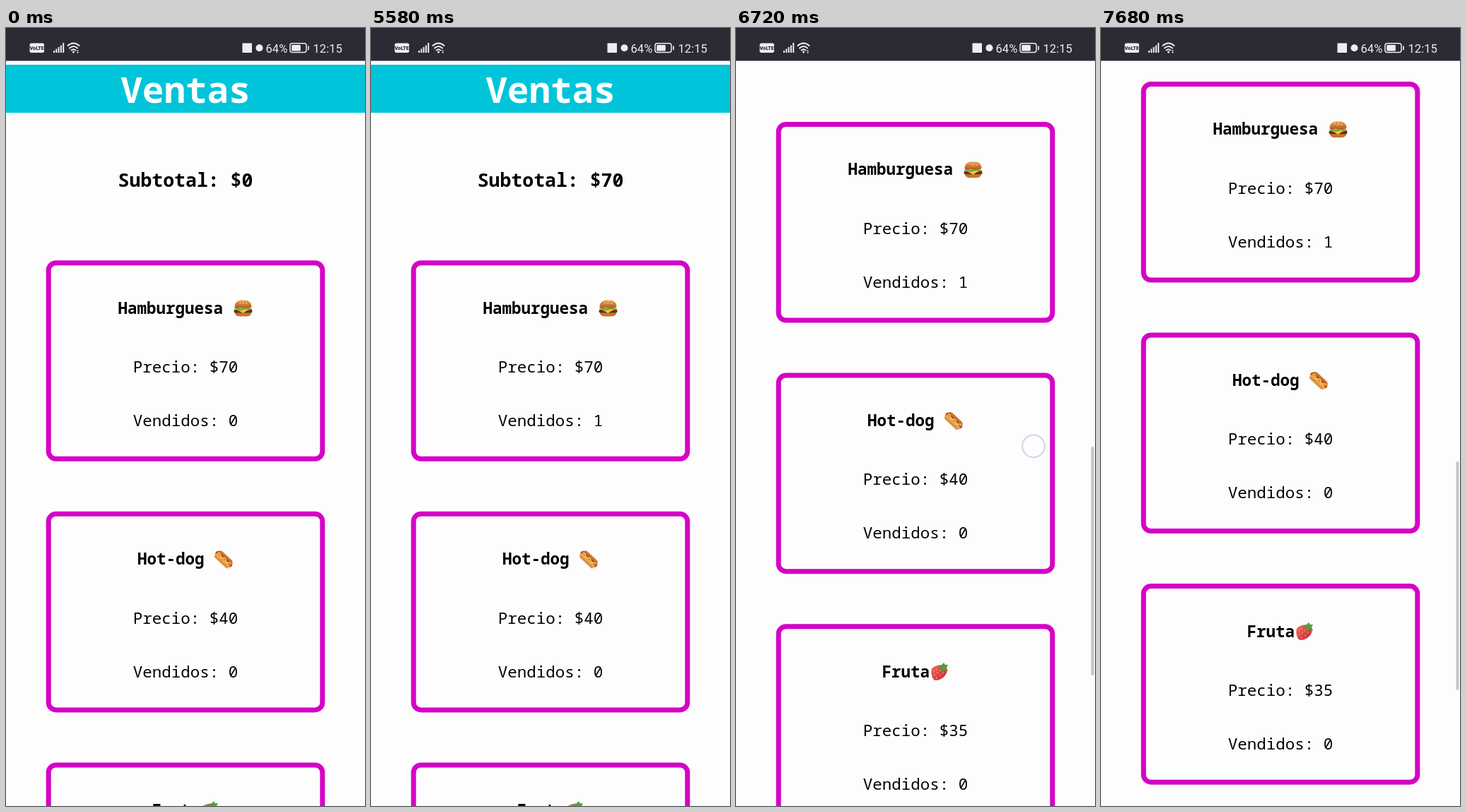
These frames come from a looping animation (508x1102 px, 8000 ms). An HTML page:

```html
<!DOCTYPE html>
<html lang="es">
<head>
<meta charset="utf-8">
<title>Ventas</title>
<style>
html, body { margin: 0; width: 100%; height: 100%; overflow: hidden; background: #fdfdfd; }
svg { display: block; width: 100vw; height: 100vh; }
#page text { font-family: "Noto Sans Mono", "DejaVu Sans Mono", monospace; font-size: 22.5px; font-weight: 500; fill: #000; }
#page .bold { font-weight: 700; }
#page .title { font-size: 51px; font-weight: 700; fill: #fff; }
#page .total { font-size: 26.5px; font-weight: 600; }
#bar text { font-family: Roboto, "Open Sans", sans-serif; font-size: 16.6px; fill: #eeeef2; }
#bar .tiny { font-size: 7.2px; font-weight: 800; fill: #2b2a35; }
</style>
</head>
<body>
<svg viewBox="0 0 508 1102" xmlns="http://www.w3.org/2000/svg">
  <defs>
    <linearGradient id="bun" x2="0" y2="1">
      <stop stop-color="#e9a04d"/><stop offset="1" stop-color="#b9601f"/>
    </linearGradient>
    <linearGradient id="berry" x2="1" y2="1">
      <stop stop-color="#f46a5c"/><stop offset="1" stop-color="#c91f31"/>
    </linearGradient>

    <!-- Food icons, centred on 0,0 -->
    <g id="burger">
      <path d="M-12 4H12Q12 11.5 5 11.5H-5Q-12 11.5-12 4Z" fill="#c8752c"/>
      <rect x="-13" y="1.5" width="26" height="5" rx="2.5" fill="#6a301a"/>
      <path d="M-12 1H12L5 3.5L0 7L-6 3.5Z" fill="#fbc53c"/>
      <path d="M-13 0Q-10-3-7-1T0-1T7-1T13 0Q12 3 8 2T0 2.5T-8 2T-13 0Z" fill="#6cae3c"/>
      <path d="M-11-1.5H11" stroke="#d8432f" stroke-width="2"/>
      <path d="M-12-2Q-12-11.5 0-11.5T12-2Q0 0-12-2Z" fill="url(#bun)"/>
      <path d="M-5-8h1.5M0-9.5h1.5M4-7h1.5M-1-6.5h1.5" stroke="#fbe1ae" stroke-linecap="round"/>
    </g>
    <g id="hotdog" transform="rotate(43)">
      <rect x="-13.5" y="-7" width="27" height="9.5" rx="4.7" fill="#c77a33"/>
      <rect x="-15" y="-3.8" width="30" height="7" rx="3.5" fill="#b94a27"/>
      <rect x="-13.5" y="-.5" width="27" height="7.5" rx="3.7" fill="#e9a455"/>
      <path d="M-11 4.8H10" stroke="#cb8238" stroke-width="1.4" stroke-linecap="round"/>
      <path d="M-12-1Q-9.5-4-7-1T-2-1T3-1T8-1T12-2" fill="none" stroke="#fbd04d" stroke-width="1.6" stroke-linecap="round"/>
    </g>
    <g id="strawberry">
      <path d="M-6-8Q-13-6-11.5 3Q-10 12-5 12Q2 12 8 5Q13-2 8-6Q2-11-6-8Z" fill="url(#berry)"/>
      <path d="M-8-2v1M-4-4v1M-7 4v1M-3 1v1M1-2v1M-4 8v1M1 5v1M5 1v1" stroke="#fbb55f" stroke-width="1.2" stroke-linecap="round"/>
      <path d="M-3-9L3-10L6-13L8-10L12-10L10-6L12-1L7-3L4 1L3-5L-3-5L0-8Z" fill="#5a9a3b"/>
    </g>
  </defs>

  <rect width="508" height="1102" fill="#fdfdfd"/>
  <g id="page">
    <rect y="52" width="508" height="68" fill="#00c4d9"/>
    <text class="title" x="254" y="106" text-anchor="middle">Ventas</text>
    <text class="total" id="total" x="254" y="224.5" text-anchor="middle"></text>
    <g id="cards"></g>
  </g>
  <rect id="thumb" x="502.5" width="4" height="324" rx="2" fill="#c4c4c6"/>
  <circle id="touch" r="15.8" fill="#fff" fill-opacity=".6" stroke="#d2d2ea" stroke-width="2"/>

  <g id="bar">
    <rect width="508" height="46.5" fill="#2b2a35"/>
    <rect x="33.5" y="21.5" width="20.5" height="13.5" rx="2.5" fill="#eeeef2"/>
    <text class="tiny" x="43.7" y="31" text-anchor="middle">VoLTE</text>
    <path d="M68 35v-3M71.3 35v-5.5M74.6 35v-8M77.9 35v-10.5M81.2 35v-14" stroke="#eeeef2" stroke-width="2"/>
    <g fill="none" stroke="#eeeef2" stroke-width="1.9" stroke-linecap="round">
      <path d="M87.5 25Q95.5 18 103.5 25M90 28.5Q95.5 23.5 101 28.5M92.6 31.5Q95.5 29 98.4 31.5"/>
    </g>
    <circle cx="95.5" cy="34" r="1.5" fill="#eeeef2"/>
    <path d="M100 33l1.5-2l1.5 2zM100 34l1.5 2l1.5-2z" fill="#eeeef2"/>
    <rect x="334.5" y="21.5" width="13.5" height="13.5" fill="#eeeef2"/>
    <circle cx="358.5" cy="28.3" r="5" fill="#eeeef2"/>
    <text x="367.5" y="34.5">64%</text>
    <rect x="402" y="21.8" width="23" height="12.8" rx="3" fill="none" stroke="#eeeef2" stroke-width="1.5"/>
    <rect x="404.3" y="24" width="12.5" height="8.4" rx="1" fill="#eeeef2"/>
    <path d="M428 26v4.5" stroke="#eeeef2" stroke-width="1.7" stroke-linecap="round"/>
    <text x="434.5" y="34.5">12:15</text>
  </g>
</svg>
<script>
const LOOP = 8000, SOLD_AT = 4180, PITCH = 355.6;
const $ = id => document.getElementById(id);

const items = [
  { name: "Hamburguesa", x: 158.5, price: 70, icon: "burger", iconX: 335.5 },
  { name: "Hot-dog", x: 186, price: 40, icon: "hotdog", iconX: 308 },
  { name: "Fruta", x: 206.5, price: 35, icon: "strawberry", iconX: 288 }
];

$("cards").innerHTML = items.map((item, i) => `
  <g transform="translate(0 ${i * PITCH})">
    <rect x="60.2" y="332.7" width="387.6" height="277.6" rx="10.5" fill="none" stroke="#d403c6" stroke-width="7"/>
    <text class="bold" x="${item.x}" y="404.7">${item.name}</text>
    <g transform="translate(${item.iconX} 397)"><use href="#${item.icon}"/></g>
    <text x="254" y="488" text-anchor="middle">Precio: $${item.price}</text>
    <text id="sold${i}" x="254" y="564" text-anchor="middle">Vendidos: 0</text>
  </g>`).join("");

// Keys are [time, value]
const scrollKeys = [[5980, 0], [6060, 6], [6140, 26], [6280, 77], [6420, 126], [6460, 138],
  [6580, 140], [6720, 196], [6860, 234], [7020, 252.6], [7400, 252.6], [7440, 253.3]];
const fingerX = [[5760, 410], [6140, 414.5], [6420, 418], [6720, 421], [7020, 418.5]];
const fingerY = [[5760, 792], [5960, 786], [6140, 756.5], [6420, 667], [6460, 655],
  [6560, 653], [6720, 592.5], [6860, 574], [7020, 571]];

function at(keys, t) {
  if (t <= keys[0][0]) return keys[0][1];
  for (let i = 1; i < keys.length; i++) {
    const [t0, a] = keys[i - 1], [t1, b] = keys[i];
    if (t < t1) return a + (b - a) * (t - t0) / (t1 - t0);
  }
  return keys[keys.length - 1][1];
}

function placeTouch(t) {
  const tap = t >= 3780 && t < 4100;
  const drag = t >= 5760 && t < 7420;
  const touch = $("touch");
  touch.setAttribute("visibility", tap || drag ? "visible" : "hidden");
  touch.setAttribute("cx", tap ? 363 : at(fingerX, t));
  touch.setAttribute("cy", tap ? 476.5 : at(fingerY, t));
}

function draw(t) {
  const scroll = at(scrollKeys, t);
  const sold = t >= SOLD_AT ? 1 : 0;
  $("page").setAttribute("transform", `translate(0 ${-scroll})`);
  $("total").textContent = `Subtotal: $${sold * items[0].price}`;
  $("sold0").textContent = `Vendidos: ${sold}`;
  $("thumb").setAttribute("y", 521.8 + scroll * 0.363);
  $("thumb").setAttribute("visibility", scroll > 0 ? "visible" : "hidden");
  placeTouch(t);
}

const start = performance.now();
function tick() {
  draw((performance.now() - start) % LOOP);
  requestAnimationFrame(tick);
}
tick();
</script>
</body>
</html>
```
